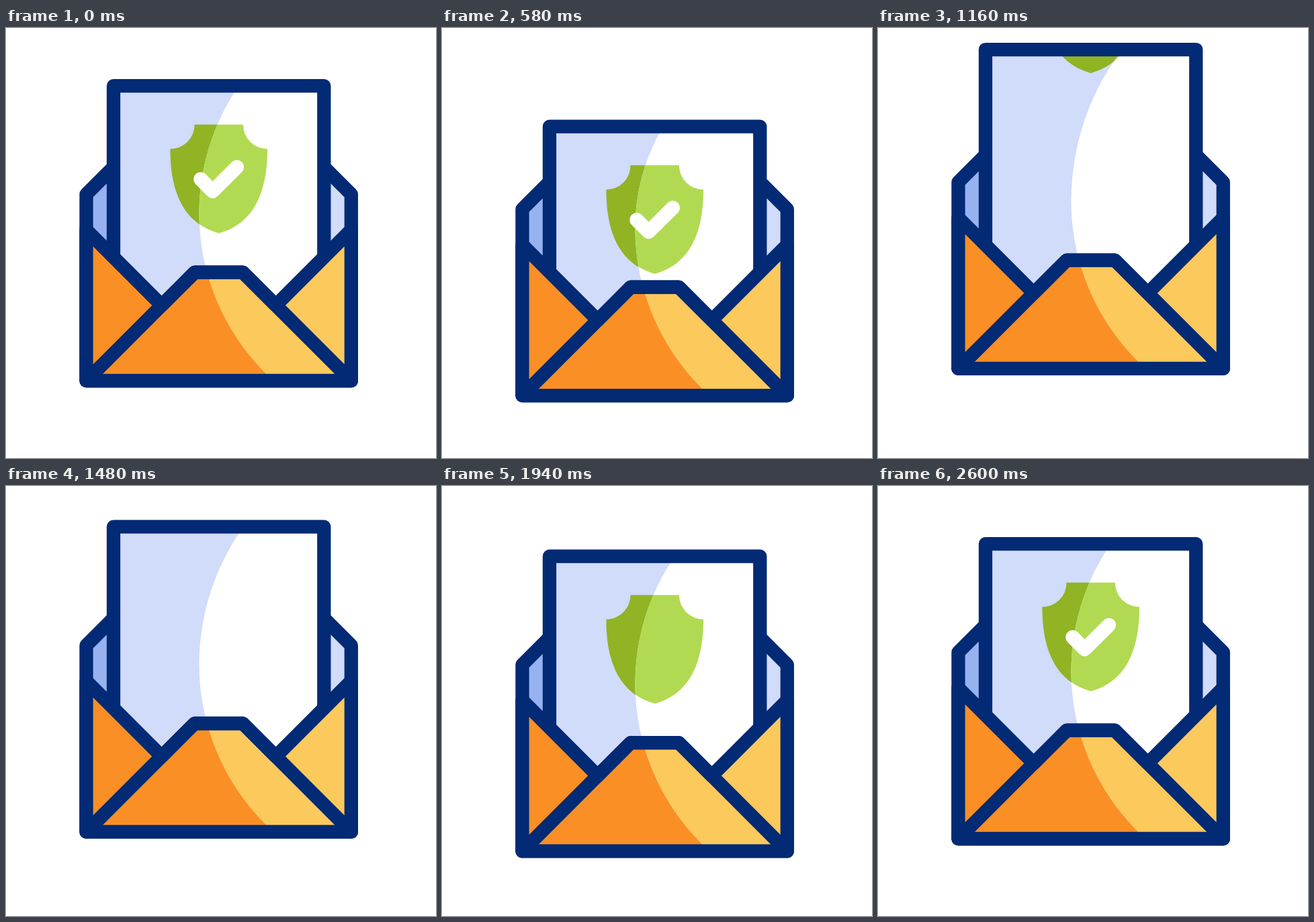
An HTML page that plays this animation: 640 px wide and 640 px high, repeating every 3 s.

```html
<!DOCTYPE html>
<html lang="en">
<head>
<meta charset="utf-8">
<title>Secure mail</title>
<style>
  html, body { margin: 0; width: 100%; height: 100%; overflow: hidden; background: #fff; }
  svg { display: block; width: 100vw; height: 100vh; }

  .line { fill: none; stroke: #032a74; stroke-width: 20.3; stroke-linejoin: round; stroke-linecap: round; }
  .dim { --paper: #d1dbfa; --badge: #90b424; }
  .lit { --paper: #fff; --badge: #b1da52; }
  .paper { fill: var(--paper); }
  .badge { fill: var(--badge); }
  .tick {
    fill: none; stroke: #fff; stroke-width: 21; stroke-linecap: round; stroke-linejoin: round;
    stroke-dasharray: 100 130;
  }
</style>
</head>
<body>
<svg viewBox="0 0 640 640">
  <defs>
    <!-- lit side of the picture -->
    <clipPath id="lens">
      <path id="bulge" d="M287.5 277V276A336 336 0 0 1 623.5 -60V277Z"/>
      <path d="M287.5 276A336 336 0 0 0 623.5 612V276Z"/>
    </clipPath>
    <clipPath id="page"><rect x="160" y="86.1" width="313.3" height="394"/></clipPath>

    <path id="back" d="M119.5 525V247.5L160 207H473.3L513.8 247.5V525Z"/>
    <path id="front" d="M119.5 300.5L231.75 412.75L280.8 363.7H352.5L401.55 412.75L513.8 300.5V525H119.5Z"/>
    <g id="sheet">
      <g id="slide">
        <g clip-path="url(#page)">
          <rect class="paper" x="160" y="86.1" width="313.3" height="394"/>
          <g id="shield">
            <path class="badge" d="M280.6 143.8H352.9A36.2 36.2 0 0 0 389.1 180C389.1 250 365.3 292 316.8 305.5C268 292 244.4 250 244.4 180A36.2 36.2 0 0 0 280.6 143.8Z"/>
            <path id="tick" class="tick" pathLength="100" d="M289.7 225L307.6 242.9L343.6 207"/>
          </g>
        </g>
      </g>
    </g>
  </defs>

  <g id="mail">
    <use href="#back" fill="#97b2f0"/>
    <use href="#back" fill="#d1dbfa" clip-path="url(#lens)"/>
    <use href="#back" class="line"/>

    <use href="#sheet" class="dim"/>
    <g clip-path="url(#lens)"><use href="#sheet" class="lit"/></g>
    <path id="frame" class="line" d="M160 470V86.1H473.3V470"/>

    <use href="#front" fill="#fa8f25"/>
    <use href="#front" fill="#fbc95c" clip-path="url(#lens)"/>
    <use href="#front" class="line"/>
    <path class="line" d="M119.5 525L280.8 363.7H352.5L513.8 525"/>
  </g>
</svg>
<script>
  // Scripted because clip paths and <use> copies must share one clock.
  const LOOP = 3000;
  const $ = id => document.getElementById(id);
  const set = (id, name, value) => $(id).setAttribute(name, value);
  const moveY = y => `translate(0 ${y})`;

  // [time, value] keys joined by an ease-in-out curve
  const BOB = [[200, 0], [705, 26], [1285, -24], [1308, -24], [1810, 26], [2178, 0]];
  const SLIDE = [[200, 0], [570, 38.5], [1225, -38], [1270, -38], [1641, 0]];
  const SCROLL = [[650, 0], [1330, -218]];
  const POP = [[1500, 0], [1875, 1]];
  const DRAW = [[1980, 100], [2380, 0]];

  function at(keys, t) {
    const i = keys.findIndex(([time]) => time > t);
    if (i === 0) return keys[0][1];
    if (i < 0) return keys[keys.length - 1][1];
    const [t0, v0] = keys[i - 1], [t1, v1] = keys[i];
    const u = (t - t0) / (t1 - t0);
    return v0 + (v1 - v0) * u * u * (3 - 2 * u);
  }

  function render(t) {
    const slide = at(SLIDE, t);
    const popped = t >= POP[0][0];
    const size = at(POP, t);

    set('mail', 'transform', moveY(at(BOB, t)));
    set('slide', 'transform', moveY(slide));
    set('frame', 'transform', moveY(slide));
    set('bulge', 'transform', `translate(0 276) scale(1 ${1 - slide / 600}) translate(0 -276)`);
    set('shield', 'transform', popped
      ? `translate(316.7 225) scale(${size}) translate(-316.7 -225)`
      : moveY(at(SCROLL, t)));
    set('tick', 'stroke-dashoffset', popped ? at(DRAW, t) : 0);
    set('tick', 'opacity', popped && t < DRAW[0][0] ? 0 : 1);
  }

  function tick() {
    render(performance.now() % LOOP);
    requestAnimationFrame(tick);
  }
  tick();
</script>
</body>
</html>
```
